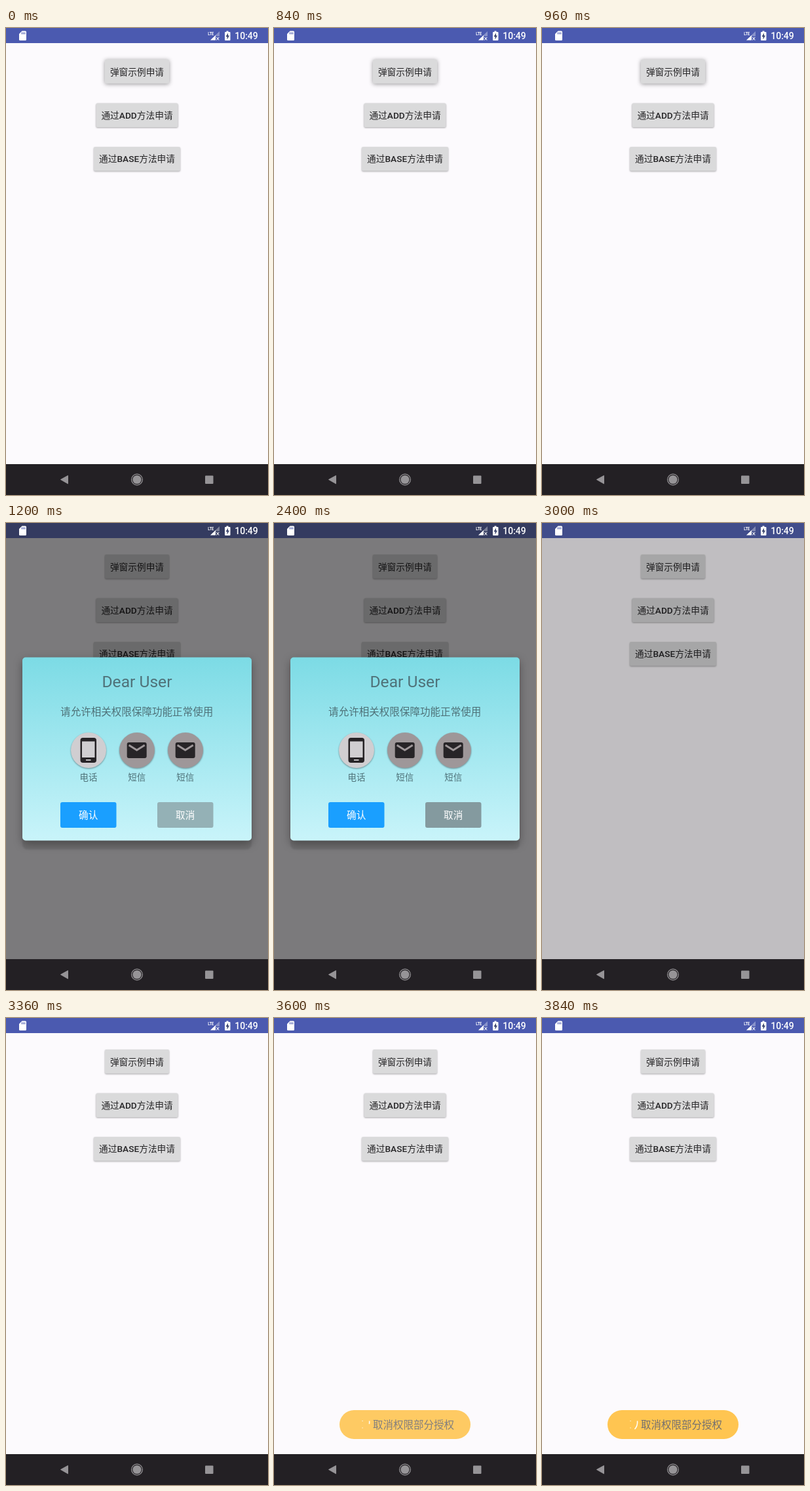
Recreate the animation shown at these times as an HTML page. Size 400x711 px, loop 4.2 s.

```html
<!DOCTYPE html>
<html lang="zh-CN">
<head>
<meta charset="utf-8">
<style>
html, body { margin: 0; width: 100%; height: 100%; overflow: hidden; background: #fcfafd; }
svg { display: block; width: 400px; height: 711px; }
text { font-family: Roboto, "Noto Sans CJK SC", "Noto Sans CJK", sans-serif; text-anchor: middle; }
.key rect { fill: #dadadb; filter: drop-shadow(0 1px 1px #0005); }
.key.pressed rect { filter: drop-shadow(0 1px 3px #0006); }
.key text { font-size: 13.7px; fill: #262527; }
.key tspan { font-weight: 500; }
#dialog text { fill: #4f7279; }
#dialog .action { font-size: 14.6px; fill: #fff; }
.badge circle { filter: drop-shadow(0 1px 1px #0006); }
.badge text { font-size: 13.5px; }
</style>
</head>
<body>
<svg viewBox="0 0 400 711">
  <defs>
    <linearGradient id="sky" x2="0" y2="1">
      <stop stop-color="#7cdbe5"/>
      <stop offset="1" stop-color="#c9f4fa"/>
    </linearGradient>
    <g id="mail">
      <rect x="-15" y="-12" width="30" height="24" rx="3" fill="#272427"/>
      <path d="M-12-7.8 0-.3 12-7.8" fill="none" stroke="#9e9799" stroke-width="3"/>
    </g>
  </defs>

  <rect width="400" height="711" fill="#fcfafd"/>
  <g class="key" id="first">
    <rect x="151" y="48" width="98" height="36.5" rx="2"/>
    <text x="200" y="71.5">弹窗示例申请</text>
  </g>
  <g class="key">
    <rect x="137.5" y="114.5" width="125" height="36.5" rx="2"/>
    <text x="200" y="137.8">通过<tspan>ADD</tspan>方法申请</text>
  </g>
  <g class="key">
    <rect x="134" y="181" width="132" height="36.5" rx="2"/>
    <text x="200" y="204">通过<tspan>BASE</tspan>方法申请</text>
  </g>
  <rect id="dim" y="23" width="400" height="641"/>

  <!-- status bar -->
  <rect id="bar" width="400" height="23"/>
  <g fill="#fff">
    <path d="M24.5 4.5H29.5Q31 4.5 31 6V17.5Q31 19 29.5 19H21.5Q20 19 20 17.5V9Z"/>
    <path d="M24.4 6.5v3M26.6 6.5v3M28.8 6.5v3" stroke="#4b5ab0" stroke-width="1.1"/>
    <text x="312.7" y="11" font-size="8" font-weight="700" textLength="9" lengthAdjust="spacingAndGlyphs">LTE</text>
    <path d="M326 5V12.5H320V18.5H312Z" opacity=".35"/>
    <path d="M320 11V18.5H312Z"/>
    <path d="M321.3 14l4 4.5m0-4.5l-4 4.5" stroke="#fff" stroke-width="1.1"/>
    <path d="M336.5 4.5h3v1.5h2q1 0 1 1V18q0 1-1 1H335q-1 0-1-1V7q0-1 1-1h1.5Z"/>
    <path d="M339 7.5 335.5 13.2H337.6V17.5L341 11.6H339Z" fill="#3c466f"/>
    <text x="367" y="17" font-size="14" font-weight="500">10:49</text>
  </g>

  <g id="dialog">
    <rect x="25" y="209" width="350" height="288" rx="8" opacity=".1" style="filter:blur(1px)"/>
    <rect x="25" y="204.5" width="350" height="279" rx="5" fill="url(#sky)" style="filter:drop-shadow(0 5px 7px #0005)"/>
    <text x="200" y="250" font-size="24.6">Dear User</text>
    <text x="199.7" y="292.5" font-size="15.55">请允许相关权限保障功能正常使用</text>
    <g class="badge">
      <circle cx="126" cy="346" r="27" fill="#d0ced1"/>
      <rect x="113.5" y="327" width="24.5" height="38" rx="4" fill="#272427"/>
      <path d="M116 332.5h19.5v24.5H116ZM122 360h7.5v1.8H122Z" fill="#d0ced1"/>
      <text x="126" y="391.5">电话</text>
    </g>
    <g class="badge">
      <circle cx="200" cy="346" r="27" fill="#9e9799"/>
      <use href="#mail" x="199.7" y="346"/>
      <text x="199.7" y="391.5">短信</text>
    </g>
    <g class="badge">
      <circle cx="274" cy="346" r="27" fill="#9e9799"/>
      <use href="#mail" x="273.7" y="346"/>
      <text x="273.7" y="391.5">短信</text>
    </g>
    <rect x="83" y="425" width="85.5" height="39" rx="3" fill="#1a9fff"/>
    <text class="action" x="125.7" y="450" style="fill:#fff">确认</text>
    <rect id="cancel" x="231" y="425" width="85.5" height="39" rx="3"/>
    <text class="action" x="273.7" y="450" style="fill:#fff">取消</text>
  </g>

  <g id="toast">
    <rect x="100" y="597" width="200" height="44" rx="22" fill="#ffc551"/>
    <path d="M134.5 613.5h1.2M134.5 624h1.2" stroke="#fff" stroke-width="1.2"/>
    <path id="arc" d="M145.6 613.5Q146.3 621 141.5 626" fill="none" stroke="#fff" stroke-width="1.5" pathLength="1" stroke-dasharray="1"/>
    <text x="213" y="625" font-size="15.5" fill="#716f70">取消权限部分授权</text>
  </g>

  <!-- navigation bar -->
  <rect y="664" width="400" height="47" fill="#232024"/>
  <g fill="#969497">
    <path d="M83.5 687.5 94.5 681.5V693.8Z" stroke="#969497" stroke-linejoin="round"/>
    <circle cx="200" cy="687.5" r="6.6"/>
    <circle cx="200" cy="687.5" r="8.4" fill="none" stroke="#969497" stroke-width="1.2"/>
    <rect x="304" y="681.5" width="12.5" height="12.5" rx="1"/>
  </g>
</svg>
<script>
const LOOP = 4200, STEP = 120;
const get = id => document.getElementById(id);
const clamp = v => Math.max(0, Math.min(1, v));
const [first, dim, bar, dialog, cancel, toast, arc] =
  ["first", "dim", "bar", "dialog", "cancel", "toast", "arc"].map(get);

function draw(now) {
  const t = Math.floor(now % LOOP / STEP) * STEP;
  const open = t >= 1200 && t < 3000;
  const closing = t >= 3000 && t < 3360;

  first.classList.toggle("pressed", t < 1200);
  dim.style.opacity = open ? .51 : closing ? .24 : 0;
  bar.style.fill = open ? "#343b60" : closing ? "#414d8b" : "#4b5ab0";
  dialog.style.display = open ? "" : "none";
  cancel.style.fill = t < 2400 ? "#94b1b6" : "#849a9f";

  const fade = clamp((t - 3360) / 360);
  toast.style.opacity = 1 - (1 - fade) ** 2;
  arc.style.strokeDashoffset = 1 - clamp((t - 3480) / 360);
}

const start = performance.now();
function tick() {
  draw(performance.now() - start);
  requestAnimationFrame(tick);
}
tick();
</script>
</body>
</html>
```
